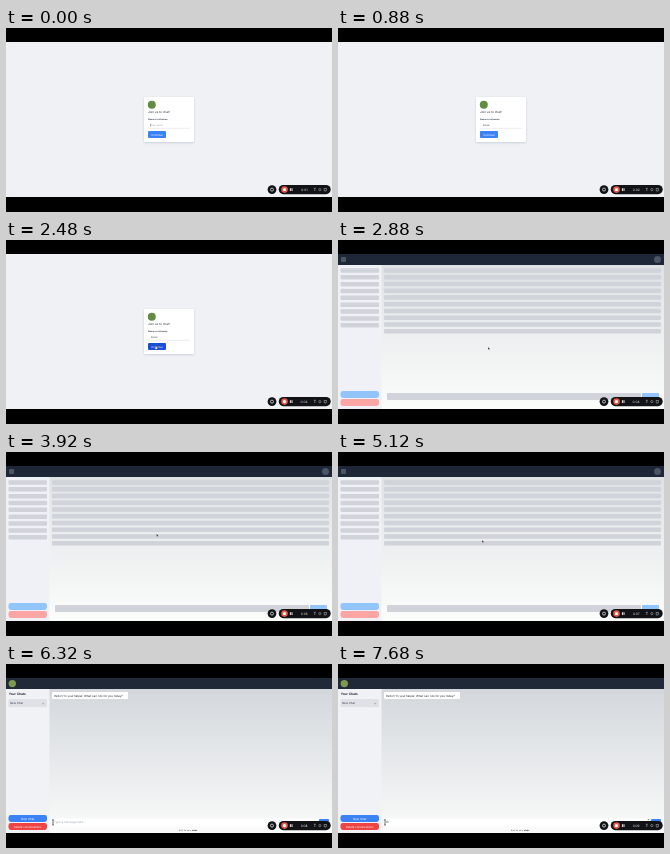
An HTML page for the animation above (8 s loop, 326 by 184 pixels).

```html
<!DOCTYPE html>
<html lang="en">
<head>
<meta charset="utf-8">
<title>Chat sign-in</title>
<style>
  html, body { margin: 0; width: 100%; height: 100%; overflow: hidden; background: #000; }
  svg { display: block; width: 100%; height: 100%; }
  text { font-family: Inter, "Liberation Sans", sans-serif; text-rendering: geometricPrecision; }
</style>
</head>
<body>
<svg viewBox="0 0 326 184">
  <defs>
    <linearGradient id="paleBg" x1="0" y1="0" x2="0" y2="1">
      <stop stop-color="#dfe2e5"/><stop offset="1" stop-color="#fbfdfb"/>
    </linearGradient>
    <linearGradient id="chatBg" x1="0" y1="0" x2="0" y2="1">
      <stop stop-color="#d3d7dc"/><stop offset="1" stop-color="#fafbfa"/>
    </linearGradient>
    <filter id="shadow" x="-20%" y="-20%" width="140%" height="140%">
      <feDropShadow dx="0" dy="0.8" stdDeviation="1" flood-color="#64748b" flood-opacity=".3"/>
    </filter>
  </defs>
  <rect width="326" height="184"/>

  <g id="login">
    <rect y="14" width="326" height="155" fill="#eff1f5"/>
    <rect x="138" y="69" width="50" height="45" rx="1.3" fill="#fff" filter="url(#shadow)"/>
    <circle cx="145.8" cy="76.7" r="4" fill="#618c44"/>
    <text x="142" y="84.9" font-size="3" fill="#272b33">Join us to chat!</text>
    <text x="142" y="91.8" font-size="2.15" font-weight="700" fill="#374151">Name or nickname</text>
    <rect x="142" y="94.3" width="42" height="6" rx=".7" fill="#fff"/>
    <path d="M142.3 100.3H183.8" stroke="#d5d8de" stroke-width=".5"/>
    <text id="name" x="144.8" y="98.2" font-size="2.4"></text>
    <path id="caret" d="M144.6 95.7V98.8" stroke="#444" stroke-width=".4"/>
    <rect id="go" x="142" y="103" width="18" height="7" rx="1"/>
    <text x="151" y="107.5" font-size="2.7" fill="#fff" text-anchor="middle">Continue</text>
  </g>

  <g id="skeleton">
    <rect x="43" y="25" width="283" height="144" fill="url(#paleBg)"/>
    <rect y="25" width="43.5" height="144" fill="#f0f1f6"/>
    <rect y="14" width="326" height="11" fill="#1e2737"/>
    <rect x="3" y="17" width="5" height="5" rx=".8" fill="#4b5563"/>
    <circle cx="319.5" cy="19.5" r="3.5" fill="#4b5563"/>
    <g id="bars" fill="#d0d3d9"></g>
    <rect x="2.5" y="151" width="38.5" height="7" rx="2.4" fill="#93c5fd"/>
    <rect x="2.5" y="159" width="38.5" height="7" rx="2.4" fill="#fca5a5"/>
    <rect x="49" y="153" width="254" height="7" rx="1" fill="#d0d3d9"/>
    <rect x="304" y="153" width="17" height="7" rx="1" fill="#93c5fd"/>
  </g>

  <g id="chat">
    <rect x="43" y="25" width="283" height="144" fill="url(#chatBg)"/>
    <rect y="25" width="43.5" height="144" fill="#f1f2f6"/>
    <rect y="14" width="326" height="11" fill="#1f2937"/>
    <circle id="logo" cx="6.3" cy="19.6" r="3.7" fill="#7d9a50"/>
    <text x="2.7" y="31.3" font-size="3.2" font-weight="700" fill="#20242c">Your Chats</text>
    <rect x="2.5" y="35" width="38.5" height="8.3" rx="1" fill="#dfe1e7"/>
    <text id="row" x="4" y="40.2" font-size="2.8" fill="#374151">New Chat</text>
    <path d="M36.4 39L37.3 39.8L38.2 39" fill="none" stroke="#555" stroke-width=".5"/>
    <rect x="46" y="28" width="76" height="7" rx="1" fill="#fff"/>
    <text x="48" y="32.5" font-size="2.85" fill="#20242c">Hello! I'm your helper. What can I do for you today?</text>
    <g fill="#fff" text-anchor="middle">
      <rect x="2.5" y="151" width="38.5" height="7" rx="2.4" fill="#3b82f6"/>
      <text x="21.7" y="155.5" font-size="2.9">New Chat</text>
      <rect x="2.5" y="159" width="38.5" height="7" rx="2.4" fill="#ef4444"/>
      <text x="21.7" y="163.5" font-size="2.75">Delete conversations</text>
    </g>
    <rect x="46" y="154.5" width="266" height="8" rx="1" fill="#fff"/>
    <text id="msg" x="48" y="159.4" font-size="2.9"></text>
    <rect id="grip" x="309.8" y="155" width="1" height="1" fill="#666"/>
    <rect x="313" y="155" width="10" height="7" rx="1" fill="#3b82f6"/>
    <text x="173" y="167" font-size="2" fill="#555">Built for easy <tspan font-weight="700" fill="#111">chats</tspan></text>
  </g>

  <g id="recorder">
    <circle cx="266" cy="161.6" r="4.4" fill="#111317"/>
    <circle cx="266" cy="161.6" r="1.5" fill="none" stroke="#ddd" stroke-width=".8"/>
    <rect x="272.7" y="157" width="52" height="9.2" rx="4.6" fill="#111317"/>
    <circle cx="278.5" cy="161.6" r="3.3" fill="#e4574b"/>
    <rect x="277.2" y="160.3" width="2.6" height="2.6" rx=".4" fill="#fff"/>
    <path d="M284.4 160.2V163M286 160.2V163" stroke="#fff" stroke-width=".9"/>
    <text id="clock" x="301.6" y="162.8" font-size="3.2" fill="#eee" text-anchor="end"></text>
    <g fill="none" stroke="#aaa" stroke-width=".6">
      <path d="M307.8 160.3H309.8M308.8 160.3V163"/>
      <circle cx="313.8" cy="161.6" r="1.1"/>
      <path d="M318 160.5H320.6L320.2 163H318.4Z"/>
    </g>
  </g>

  <path id="arrow" d="M0 0V2.7L.7 2.1L1.2 3.2L1.7 3L1.2 1.9H2Z" fill="#111" stroke="#fff" stroke-width=".25"/>
  <path id="hand" d="M-.4 -1.5H.3V0L1.5 .4V1.5L1 2.2H-.6L-1.5 .6L-.4 .7Z" fill="#fff" stroke="#111" stroke-width=".3"/>
  <path id="beam" d="M-.8 -2.6H.8M0 -2.6V2.6M-.8 2.6H.8" fill="none" stroke="#111" stroke-width=".6"/>
</svg>
<script>
const LOOP = 8000;
const $ = id => document.getElementById(id);
const clamp = v => Math.max(0, Math.min(1, v));
const ramp = (t, a, b) => clamp((t - a) / (b - a));
const ease = p => p * p * (3 - 2 * p);
const show = (id, on) => $(id).setAttribute("display", on ? "inline" : "none");

// time, x, y
const path = [
  [1800, 149, 104], [2320, 150, 107], [3360, 150, 107], [3460, 157, 115],
  [3600, 153, 79], [3760, 152, 79], [4160, 148, 87], [4320, 146.5, 87.5],
  [4640, 144, 88], [5760, 144, 88], [6000, 17, 160], [6160, 47, 158.4]
];
const nameKeys = [120, 320, 400, 560];
const msgKeys = [7480, 7640];

function addBars(x, width, count, step) {
  for (let i = 0; i < count; i++) {
    const bar = document.createElementNS("http://www.w3.org/2000/svg", "rect");
    const box = { x, y: 28.2 + i * step, width, height: 4.5, rx: 1 };
    for (const k in box) bar.setAttribute(k, box[k]);
    $("bars").append(bar);
  }
}

function pointer(t) {
  const i = path.findIndex(p => p[0] > t);
  if (i < 0) return path[path.length - 1].slice(1);
  if (i === 0) return path[0].slice(1);
  const [a, b] = [path[i - 1], path[i]];
  const p = ease(ramp(t, a[0], b[0]));
  return [1, 2].map(k => a[k] + (b[k] - a[k]) * p);
}

function field(id, word, keys, hint, t) {
  const n = keys.filter(k => t >= k).length;
  $(id).textContent = n ? word.slice(0, n) : hint;
  $(id).setAttribute("fill", n ? "#374151" : "#9ca3af");
}

function mix(a, b, p) {
  return `rgb(${a.map((v, i) => Math.round(v + (b[i] - v) * p))})`;
}

function draw(t) {
  show("login", t < 2840);
  show("skeleton", t >= 2840 && t < 5160);
  show("chat", t >= 5160);

  field("name", "Demo", nameKeys, "Your name", t);
  show("caret", t < 120);
  $("go").setAttribute("fill", mix([59, 130, 246], [29, 78, 216], ramp(t, 1920, 2160)));

  show("logo", t >= 5280);
  $("row").setAttribute("opacity", ramp(t, 5240, 5560));
  field("msg", "Hi", msgKeys, "Type a message here…", t);
  show("grip", t >= 6440);

  $("clock").textContent = "0:0" + (1 + Math.floor((t + 960) / 1000));

  const [x, y] = pointer(t);
  const kind = t < 1800 ? "" : t < 2840 ? "hand" : t < 6120 ? "arrow" : "beam";
  for (const id of ["arrow", "hand", "beam"]) {
    show(id, id === kind);
    $(id).setAttribute("transform", `translate(${x} ${y})`);
  }
}

addBars(2.5, 38.5, 9, 6.85);
addBars(46, 277, 10, 6.75);

const start = performance.now();
function tick() {
  draw((performance.now() - start) % LOOP);
  requestAnimationFrame(tick);
}
tick();
</script>
</body>
</html>
```
